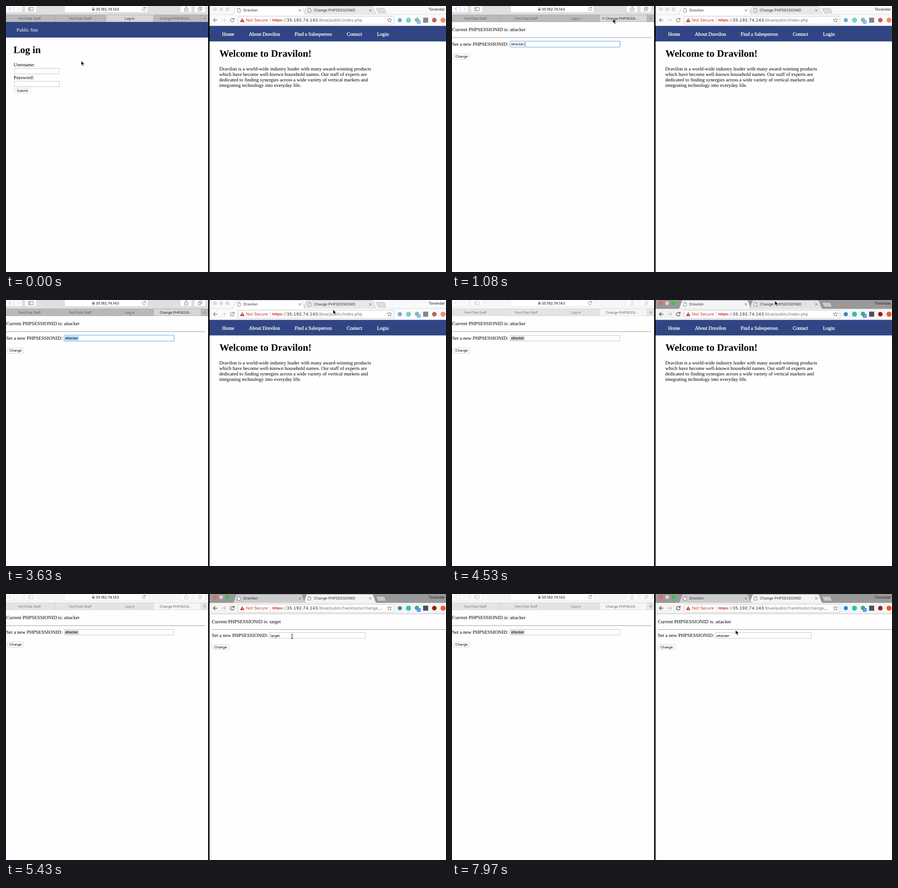
Write an HTML page that moves like this. It is 962 by 582 pixels and loops after 8000 ms.

```html
<!DOCTYPE html>
<html lang="en">
<head>
<meta charset="utf-8">
<title>Session change</title>
<style>
html, body { margin: 0; width: 100%; height: 100%; overflow: hidden; background: #fff; }
svg { display: block; }

/* All on/off states and theme colours live in custom properties. */
#stage {
  --bar: #dfdfdf; --tab: #b9b9b9; --tab3: #d7d7d7; --tab4: #b9b9b9; --edge: #a2a2a2;
  --icon: #777; --btn: #fbfbfb; --btnEdge: #cfcfcf; --label: #5c5c5c; --label3: #222; --label4: #5c5c5c;
  --hover: none; --left2: none; --caret: #000; --sel: transparent; --ring: #a6cff8;
  --strip: #f9f9f9; --tabA: #fff; --tabB: #e8e8e8; --tabEdge: #b4b4b4; --tool: #fbfbfb;
  --red: #dcdcdc; --mid: #dcdcdc; --green: #dcdcdc; --ext: .68; --newTab: #dcdcdc; --nav: #8a8a8a;
  --right1: inline; --right2: none; --ring2: transparent; --sel2: transparent; --caret2: transparent;
  --old: inline; --new: none; --done: none; --load: none; --doc: inline;
  --arrow: inline; --beam: none;
  animation: state 8s step-end infinite;
}
@keyframes state {
  9.75% { --hover: inline; --label4: #222; }
  13.5% { --left2: inline; --tab3: #b9b9b9; --tab4: #d7d7d7; --label3: #5c5c5c; }
  15.375% { --hover: none; }
  19.125% { --arrow: none; --beam: inline; }
  21% { --caret: transparent; --sel: #b3d7fe; }
  24.75% { --arrow: inline; --beam: none; }
  56.625% {
    --bar: #f6f6f6; --tab: #e4e4e4; --tab3: #e4e4e4; --tab4: #f5f5f5; --edge: #cfcfcf;
    --icon: #c3c3c3; --btn: #fcfcfc; --btnEdge: #e4e4e4; --label: #777; --label3: #777; --label4: #666;
    --sel: #d5d5d5; --ring: transparent;
    --strip: #999; --tabA: #f4f4f4; --tabB: #e3e3e3; --tabEdge: #7d7d7d; --tool: #f4f4f4;
    --red: #fc5b57; --mid: #d2d2d2; --green: #35c64a; --ext: 1; --newTab: #c9c9c9; --nav: #555;
  }
  58.5% { --right1: none; --right2: inline; --tabA: #cdcdcd; --tabB: #f4f4f4; }
  62.25% { --arrow: none; --beam: inline; }
  71.625% { --ring2: #66a9f2; }
  73.5% { --sel2: #b3d7fe; }
  81% { --sel2: transparent; --caret2: #000; --old: none; --new: inline; --arrow: inline; --beam: none; }
  90.375% { --ring2: transparent; --caret2: transparent; --done: inline; --load: inline; --doc: none; }
  94.125% { --load: none; --doc: inline; }
}

#pointer { animation: move 8s steps(1) infinite; }
@keyframes move {
  0% { transform: translate(164.5px, 120px); animation-timing-function: steps(4); }
  7.5% { transform: translate(300px, 53px); }
  9.75% { transform: translate(352px, 28px); }
  13.5% { transform: translate(352px, 28px); animation-timing-function: steps(3); }
  19.125% { transform: translate(162px, 83px); animation-timing-function: steps(2); }
  22.875% { transform: translate(126px, 84px); }
  24.75% { transform: translate(108px, 105px); }
  34.125% { transform: translate(108px, 105px); animation-timing-function: steps(6); }
  45.375% { transform: translate(715px, 21px); }
  47.25% { transform: translate(622px, 75px); animation-timing-function: steps(3); }
  52.875% { transform: translate(706px, 2px); }
  58.5% { transform: translate(706px, 2px); animation-timing-function: steps(2); }
  62.25% { transform: translate(640px, 90px); }
  64.125% { transform: translate(640px, 90px); animation-timing-function: steps(2); }
  67.875% { transform: translate(625.5px, 93px); animation-timing-function: steps(2); }
  71.625% { transform: translate(600px, 92px); animation-timing-function: steps(2); }
  75.375% { transform: translate(562px, 90px); }
  79.125% { transform: translate(562px, 90px); animation-timing-function: steps(3); }
  84.75% { transform: translate(498.5px, 112.5px); animation-timing-function: steps(2); }
  88.5% { transform: translate(469px, 114px); }
  92.25% { transform: translate(469px, 114px); animation-timing-function: steps(2); }
  96% { transform: translate(500px, 166px); }
  97.875% { transform: translate(570px, 125px); }
  99.625%, to { transform: translate(620px, 79px); }
}

text { font: 10.8px "Liberation Serif", "Times New Roman", serif; text-rendering: geometricPrecision; white-space: pre; }
.h1 { font-size: 21.6px; font-weight: bold; }
.menu { fill: #fff; stroke: #fff; stroke-width: .3; }
.ui { font: 7.4px Inter, Roboto, sans-serif; }
.mid { text-anchor: middle; }
.title { font-size: 8.05px; fill: #333; }
.url { font-size: 9px; fill: #777; }
.host { fill: #222; letter-spacing: .2px; font-feature-settings: "tnum"; }
.warn { fill: #c53929; }
.field { fill: #fff; stroke: #c6c6c6; }
.button { fill: #fff; stroke: #cacaca; stroke-width: .8; }
.btn { fill: var(--btn); stroke: var(--btnEdge); stroke-width: .7; }
.line { fill: none; stroke: var(--icon); }
.page { fill: #fefefe; }
.blue { fill: #314583; }
.navi { fill: none; stroke: var(--nav); stroke-width: 1.4; }
</style>
</head>
<body>
<svg id="stage" width="962" height="582" viewBox="0 0 962 582">
<defs>
  <path id="doc" d="M.5.5h4l2 2v6h-6zM4.5.5v2h2" fill="#fff" stroke="#666" stroke-width=".8"/>
  <path id="cross" d="M-2.3-2.3l4.6 4.6M2.3-2.3l-4.6 4.6" stroke="#555"/>
</defs>
<rect class="page" width="962" height="582"/>

<!-- left window: toolbar and tabs -->
<rect width="442" height="19" fill="var(--bar)"/>
<g class="btn">
  <rect x="-3" y="-3" width="20.5" height="17" rx="2.5"/>
  <rect x="17.5" y="-3" width="18" height="17" rx="2.5"/>
  <rect x="41" y="-3" width="26" height="17" rx="2.5"/>
  <rect x="381" y="-3" width="25" height="17" rx="2.5"/>
  <rect x="411.500" y="-3" width="25" height="17" rx="2.5"/>
</g>
<rect x="128" y="-3" width="182" height="17" rx="2.5" fill="#fff" stroke="var(--btnEdge)" stroke-width=".7"/>
<g class="line">
  <path d="M11 2.500L7 6.500l4 4"/>
  <path d="M25 2.500l4 4-4 4" opacity=".45"/>
  <path d="M49.500 3h10v7.500h-10zM53 3v7.500M50.500 5h1.500M50.500 7h1.500" stroke-width=".9"/>
  <path d="M392 5h-1.500v6h7V5H396M394 8V1.500M392 3l2-2 2 2" stroke-width=".9"/>
  <path d="M420.500 5h5v5.500h-5zM422.500 5V2.500h5.500V8h-2.500" stroke-width=".9"/>
</g>
<path d="M304.500 4.500a3.500 3.500 0 1 0 .8 2.500M305 1.800v2.900h-2.900" fill="none" stroke="#666" stroke-width=".9"/>
<rect x="188.500" y="6" width="5" height="4" rx=".5" fill="#777"/>
<path d="M189.500 6V4.700a1.500 1.500 0 0 1 3 0V6" fill="none" stroke="#777" stroke-width=".9"/>
<text class="ui" x="196" y="9.800" style="font-size:7.950px;font-weight:500" fill="#333">35.192.74.143</text>

<rect y="19" width="442" height="16" fill="var(--tab)"/>
<rect x="218.500" y="19" width="104" height="16" fill="var(--tab3)"/>
<rect x="322.500" y="19" width="104" height="16" fill="var(--tab4)"/>
<path d="M0 19.300H442M0 34.700H442M107 19v16M218.500 19v16M322.500 19v16M426.500 19v16" stroke="var(--edge)" stroke-width=".7"/>
<path d="M434.500 23.500v7M431 27h7" stroke="#858585" stroke-width=".8"/>
<g class="mid" fill="var(--label)">
  <text class="ui" x="51.500" y="29.700">FernTide Staff</text>
  <text class="ui" x="162.500" y="29.700">FernTide Staff</text>
  <text class="ui" x="270.500" y="29.700" fill="var(--label3)">Log in</text>
  <text class="ui" x="371.500" y="29.700" fill="var(--label4)">Change PHPSESSI...</text>
</g>
<use href="#cross" x="331" y="27" style="display:var(--hover)"/>

<!-- left window: login page -->
<rect class="blue" y="35" width="442" height="34"/>
<text class="menu" style="stroke:none" x="23" y="56">Public Site</text>
<text class="h1" x="16.500" y="103">Log in</text>
<text x="16.800" y="132">Username:</text>
<rect class="field" x="18.500" y="136.500" width="98" height="12"/>
<text x="16.800" y="160">Password:</text>
<rect class="field" x="18.500" y="164.500" width="98" height="12"/>
<rect class="button" x="18.500" y="180" width="35" height="11" rx="2.500"/>
<text class="ui mid" x="36" y="188.200">Submit</text>

<!-- left window: session page -->
<g style="display:var(--left2)">
  <rect class="page" y="35" width="442" height="180"/>
  <text x=".5" y="55.300">Current PHPSESSIONID is: attacker</text>
  <path d="M0 69.200H436" stroke="#999"/>
  <text x=".5" y="86.500">Set a new PHPSESSIONID:</text>
  <rect class="field" x="127.500" y="77.500" width="239.500" height="12"/>
  <rect x="127" y="77" width="240.500" height="13" rx="1" fill="none" stroke="var(--ring)" stroke-width="2"/>
  <rect x="129" y="79" width="30" height="9.500" fill="var(--sel)"/>
  <text class="ui" x="129" y="86.300">attacker</text>
  <path d="M159.500 79v9.500" stroke="var(--caret)" stroke-width=".8"/>
  <rect class="button" x="2.500" y="105" width="36.500" height="11.500" rx="2.500"/>
  <text class="ui mid" x="20.700" y="113.400">Change</text>
</g>

<!-- right window: tab strip -->
<rect x="445" width="517" height="20" fill="var(--strip)"/>
<circle cx="457" cy="7" r="4.300" fill="var(--red)"/>
<circle cx="470.500" cy="7" r="4.300" fill="var(--mid)"/>
<circle cx="484" cy="7" r="4.300" fill="var(--green)"/>
<path d="M445 19H962" stroke="var(--tabEdge)" stroke-width=".7"/>
<g stroke="var(--tabEdge)" stroke-width=".7">
  <path d="M649 19.500C653 18 654 1 659 .5H800C805 1 806 18 811 19.500" fill="var(--tabB)"/>
  <path d="M495 19.500C499 18 500 1 505 .5H645C650 1 651 18 655 19.500" fill="var(--tabA)"/>
  <path d="M810 5H825Q827 5 828 7L831 14Q831 15.500 829 15.500H816Q814 15.500 813 14L809.500 6.500Z" fill="var(--newTab)"/>
</g>
<use href="#doc" x="506" y="5"/>
<use href="#doc" x="660" y="5" style="display:var(--doc)"/>
<path d="M663.500 5.500a3.700 3.700 0 1 1-3.700 3.700" fill="none" stroke="#7a8ca8" stroke-width="1.300" style="display:var(--load)"/>
<text class="ui title" x="519" y="12">Dravilon</text>
<text class="ui title" x="673" y="12">Change PHPSESSIONID</text>
<use href="#cross" x="642.500" y="9.500"/>
<use href="#cross" x="796.500" y="9.500"/>
<text class="ui title" x="924" y="10.300" style="fill:#222">Tovandar</text>

<!-- right window: toolbar -->
<rect x="445" y="19.300" width="517" height="24.200" fill="var(--tool)"/>
<g class="navi">
  <path d="M462 31h-8.500M457.500 26.800L453.300 31l4.200 4.200"/>
  <path d="M471.500 31h8.500M476 26.800l4.200 4.200-4.200 4.200" opacity=".3"/>
  <path d="M497.800 28.300a4 4 0 1 0 .8 3.700M498.700 26v3.300h-3.300"/>
</g>
<rect x="507.500" y="22.500" width="340.500" height="17.500" rx="2" fill="#fff" stroke="#bdbdbd" stroke-width=".8"/>
<path class="warn" d="M516.500 26.500l5 8.700h-10z"/>
<path d="M516.500 29.500v2.700M516.500 33v1.200" stroke="#fff"/>
<path d="M577.500 25.500v11.500" stroke="#bbb" stroke-width=".8"/>
<text class="ui url warn" x="524.800" y="34.200">Not Secure</text>
<text class="ui url warn" x="582" y="34.200">https</text>
<path d="M581.500 31.200h23" stroke="#c53929" stroke-width=".9"/>
<text class="ui url" x="604.500" y="34.200">://</text>
<text class="ui url host" x="613.800" y="34.200">35.192.74.143</text>
<text class="ui url" x="683" y="34.200" style="display:var(--right1)">/blue/public/index.php</text>
<text class="ui url" x="683" y="34.200" style="display:var(--right2)">/blue/public/hacktools/change_...</text>
<path d="M838.500 26.300l1.400 3 3.300.4-2.400 2.200.6 3.300-2.900-1.600-2.900 1.600.6-3.300-2.400-2.200 3.300-.4z" fill="none" stroke="#666" stroke-width=".9"/>
<g opacity="1" style="opacity:var(--ext)">
  <circle cx="861" cy="31" r="4.500" fill="#2b86c9"/>
  <circle cx="880" cy="31" r="5.500" fill="#2fc3ae"/>
  <circle cx="898.500" cy="30.500" r="4.800" fill="#3fae6a"/>
  <rect x="898.500" y="31" width="8" height="8" rx="1" fill="#4a90f0"/>
  <text class="ui mid" x="902.500" y="37.500" style="font-size:6.500px" fill="#fff">1</text>
  <rect x="912" y="25.500" width="11" height="11" fill="#46525f"/>
  <circle cx="936.500" cy="31" r="5" fill="#a01818"/>
  <circle cx="955.500" cy="31" r="5.500" fill="#f0582a"/>
</g>

<!-- right window: welcome page -->
<rect class="blue" x="445" y="43.500" width="517" height="34"/>
<g class="menu">
  <text x="472.500" y="64.700">Home</text>
  <text x="531" y="64.700">About Dravilon</text>
  <text x="631" y="64.700">Find a Salesperson</text>
  <text x="745" y="64.700">Contact</text>
  <text x="811" y="64.700">Login</text>
</g>
<text class="h1" x="466.500" y="111">Welcome to Dravilon!</text>
<text y="141"><tspan x="466.300">Dravilon is a world-wide industry leader with many award-winning products</tspan><tspan x="466.300" dy="12.150">which have become well-known household names. Our staff of experts are</tspan><tspan x="466.300" dy="12.150">dedicated to finding synergies across a wide variety of vertical markets and</tspan><tspan x="466.300" dy="12.150">integrating technology into everyday life.</tspan></text>

<!-- right window: session page -->
<g style="display:var(--right2)">
  <rect class="page" x="445" y="43.500" width="517" height="150"/>
  <path d="M445 43.300H962" stroke="#c4c4c4" stroke-width=".8"/>
  <text x="450" y="64.300">Current PHPSESSIONID is: target</text>
  <g style="display:var(--done)">
    <rect class="page" x="450" y="52" width="170" height="18"/>
    <text x="450" y="64.300">Current PHPSESSIONID is: attacker</text>
  </g>
  <path d="M450 77.700H962" stroke="#999"/>
  <text x="450" y="93.800">Set a new PHPSESSIONID:</text>
  <rect class="field" x="576" y="84.500" width="209.500" height="12.500"/>
  <rect x="576" y="84.500" width="209.500" height="12.500" rx="1" fill="none" stroke="var(--ring2)" stroke-width="2"/>
  <rect x="578" y="86" width="21.500" height="9.500" fill="var(--sel2)"/>
  <text class="ui" x="578" y="93.700" style="display:var(--old)">target</text>
  <text class="ui" x="578" y="93.700" style="display:var(--new)">attacker</text>
  <path d="M607.600 86v9.500" stroke="var(--caret2)" stroke-width=".8"/>
  <rect class="button" x="450.500" y="110.300" width="37" height="11.500" rx="2.500"/>
  <text class="ui mid" x="469" y="118.700">Change</text>
</g>

<rect x="442" width="3" height="582"/>

<g id="pointer">
  <path d="M0 0V9.700L2.300 7.600 4 11.500 5.700 10.800 4.100 7H7.200Z" stroke="#fff" stroke-width=".7" style="display:var(--arrow)"/>
  <path d="M-2-5Q0-5 0-3.500Q0-5 2-5M0-3.500V3.500M-2 5Q0 5 0 3.500Q0 5 2 5M-1 1.500H1" fill="none" stroke="#111" style="display:var(--beam)"/>
</g>
</svg>
</body>
</html>
```
